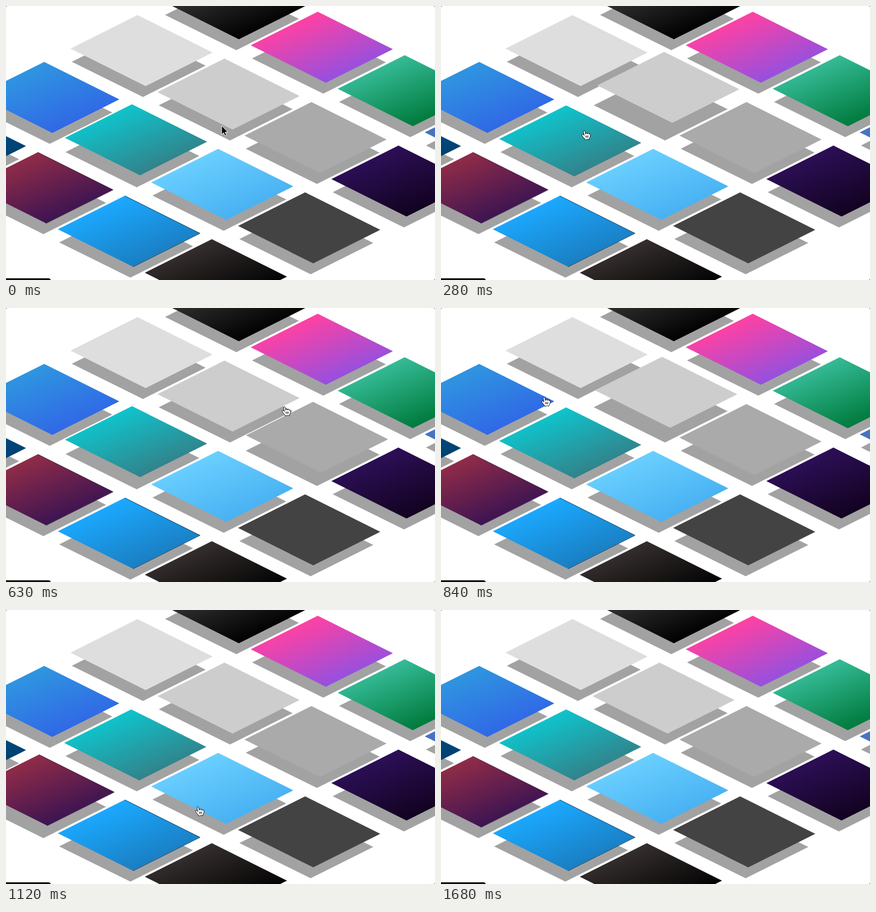
An HTML page for the animation above (1.96 s loop, 768 px wide and 490 px high).

```html
<!DOCTYPE html>
<html lang="en">
<head>
<meta charset="utf-8">
<title>Isometric tiles</title>
<style>
  html, body { margin: 0; width: 100%; height: 100%; overflow: hidden; background: #fff; }
  svg { display: block; width: 768px; height: 490px; }
</style>
</head>
<body>
<svg id="stage" viewBox="0 0 768 490" xmlns="http://www.w3.org/2000/svg">
  <defs id="defs"></defs>
  <g id="shadows" fill="#a2a2a2"></g>
  <g id="tiles"></g>
  <path d="M0 486H75Q80 486 81 490H0Z" fill="#ddd"/>
  <path d="M0 487H76Q79 487 80 490H0Z" fill="#111"/>
  <path d="M0 0H2L0 2ZM768 0H766L768 2ZM768 490H766L768 488Z" fill="#777"/>
  <path id="arrow" d="M0 0V16L3.6 12.6 6 18.2 8.6 17 6.3 11.6H11.2Z" fill="#000" stroke="#fff"/>
  <g id="hand" stroke="#000" stroke-width=".9" stroke-linejoin="round">
    <path fill="#fff" d="M3 12.8Q2 11.2 .4 9.2Q-.3 7.4 1.5 6.9Q2.8 7.1 4.3 9L3.1 3.2Q2.5 .4 4 .1Q5.5 0 6 2L7 6.6Q6.7 4.5 8.2 4.2Q10.2 4.1 10.3 6.7Q10.1 4.8 11.6 4.7Q13.3 4.8 13.4 7.1Q13.7 5.9 14.8 6.1Q15.6 6.6 15.6 8.5Q15.7 11 14.4 13Q13.1 14.4 13.2 16.5Q11.4 16.9 10.7 15.4Q10.2 15 9.4 16.4Q7.6 16.8 5.6 16.5Q5.9 14.8 3 12.8Z"/>
    <path fill="none" d="M7.2 9.2V13M9.2 9.2V13M11.2 9.2V13"/>
  </g>
</svg>
<script>
const LOOP = 1960, STEP = 70, LAST = 24;

// The two edges that span a tile from its top corner.
const U = { x: 134.5, y: 67 }, V = { x: -120, y: 60 };
const TILE = `M0 0l${U.x} ${U.y} ${V.x} ${V.y} ${-U.x} ${-U.y}Z`;
const EDGE = `M0 .4l${U.x} ${U.y} ${V.x} ${V.y}`;
const SHADOW = 'M-5.5 27.5L122 90.5 9.9 146.5 -117.6 83.5Z';

// Grid rows from back to front: [upper colour, lower colour, edge colour].
const rows = [
  [['#3a3838', '#000000'], ['#ff41a2', '#9450e0'], ['#35bb97', '#007a3c'], ['#4a74c4', '#3f62b4']],
  [['#dedede'], ['#cdcdcd'], ['#aaaaaa'], ['#2c0f57', '#12021f']],
  [['#2f96e0', '#3068e6'], ['#0fc4cc', '#32828a'], ['#6acfff', '#48b1f2'], ['#434343']],
  [['#00599c', '#00406e'], ['#912c48', '#3c1452', '#44204a'], ['#1ba9ff', '#1a7ec2', '#174668'], ['#352e2e', '#000000']]
];

// Pointer path, one point per two steps, joined by a smooth curve.
const path = [
  [386, 214], [395, 165], [257, 223.5], [335, 272], [525, 245], [420, 118], [185, 160],
  [130, 304.5], [344, 352.5], [600, 290], [642, 416], [520, 470], [560, 560]
];

// Lift on hover: reaction time in ms, speeds in px per ms, height in px.
const DELAY = 60, RISE = 0.08, FALL = 0.06, TOP = 13, TICK = 5;

const $ = id => document.getElementById(id);

function add(parent, tag, attrs = {}) {
  const el = document.createElementNS('http://www.w3.org/2000/svg', tag);
  for (const k in attrs) el.setAttribute(k, attrs[k]);
  return parent.appendChild(el);
}

function place(el, x, y) {
  el.setAttribute('transform', `translate(${x.toFixed(2)} ${y.toFixed(2)})`);
}

function gradient(id, from, to) {
  const g = add($('defs'), 'linearGradient',
    { id, gradientUnits: 'userSpaceOnUse', x1: 0, y1: 0, x2: 47, y2: 114 });
  add(g, 'stop', { offset: 0, 'stop-color': from });
  add(g, 'stop', { offset: 1, 'stop-color': to });
  return `url(#${id})`;
}

function makeTile([from, to, edge], col, row) {
  const x = 391.1 + 155.7 * col - 167 * row;
  const y = 94 + 77.8 * col + 83.7 * row;
  const fill = to ? gradient(`g${row + 1}${col + 1}`, from, to) : from;
  place(add($('shadows'), 'path', { d: SHADOW }), x, y);
  const el = add($('tiles'), 'g');
  add(el, 'path', { d: TILE, fill });
  if (edge) add(el, 'path', { d: EDGE, fill: 'none', stroke: edge });
  return { x, y, el, lifts: [] };
}

// Catmull-Rom curve through the pointer path.
function pointer(ms) {
  const s = Math.max(0, ms) / (2 * STEP);
  const i = Math.min(Math.floor(s), path.length - 2), k = Math.min(s - i, 1);
  const at = n => path[Math.max(0, Math.min(path.length - 1, n))];
  return [0, 1].map(j => {
    const [a, b, c, d] = [-1, 0, 1, 2].map(n => at(i + n)[j]);
    return b + k / 2 * (c - a + k * (2 * a - 5 * b + 4 * c - d + k * (3 * (b - c) + d - a)));
  });
}

function inside(tile, [px, py]) {
  const x = px - tile.x, y = py - tile.y, det = U.x * V.y - V.x * U.y;
  const u = (x * V.y - y * V.x) / det, v = (U.x * y - U.y * x) / det;
  return u > 0 && u < 1 && v > 0 && v < 1;
}

// Runs the hover response once and keeps the lift at every step.
function record(tile, lift = 0) {
  for (let ms = 0; ms <= LAST * STEP; ms += TICK) {
    if (ms % STEP === 0) tile.lifts.push(lift);
    const speed = inside(tile, pointer(ms - DELAY)) ? RISE : -FALL;
    lift = Math.max(0, Math.min(TOP, lift + speed * TICK));
  }
}

const tiles = rows.flatMap((row, r) => row.map((look, c) => makeTile(look, c - 1, r - 1)));
const settling = tiles[9]; // still coming down when the loop begins
tiles.forEach(tile => record(tile, tile === settling ? 2 : 0));

function draw(ms) {
  const step = Math.min(LAST, Math.floor(ms / STEP));
  for (const { el, x, y, lifts } of tiles) place(el, x + lifts[step] * 0.7, y - lifts[step]);
  const [x, y] = pointer(step * STEP);
  place($('arrow'), x, y);
  place($('hand'), x - 5, y - 1);
  $('arrow').style.display = step === 0 ? '' : 'none';
  $('hand').style.display = step > 0 && step < LAST ? '' : 'none';
}

const start = performance.now();
function tick() {
  draw((performance.now() - start) % LOOP);
  requestAnimationFrame(tick);
}
draw(0);
requestAnimationFrame(tick);
</script>
</body>
</html>
```
